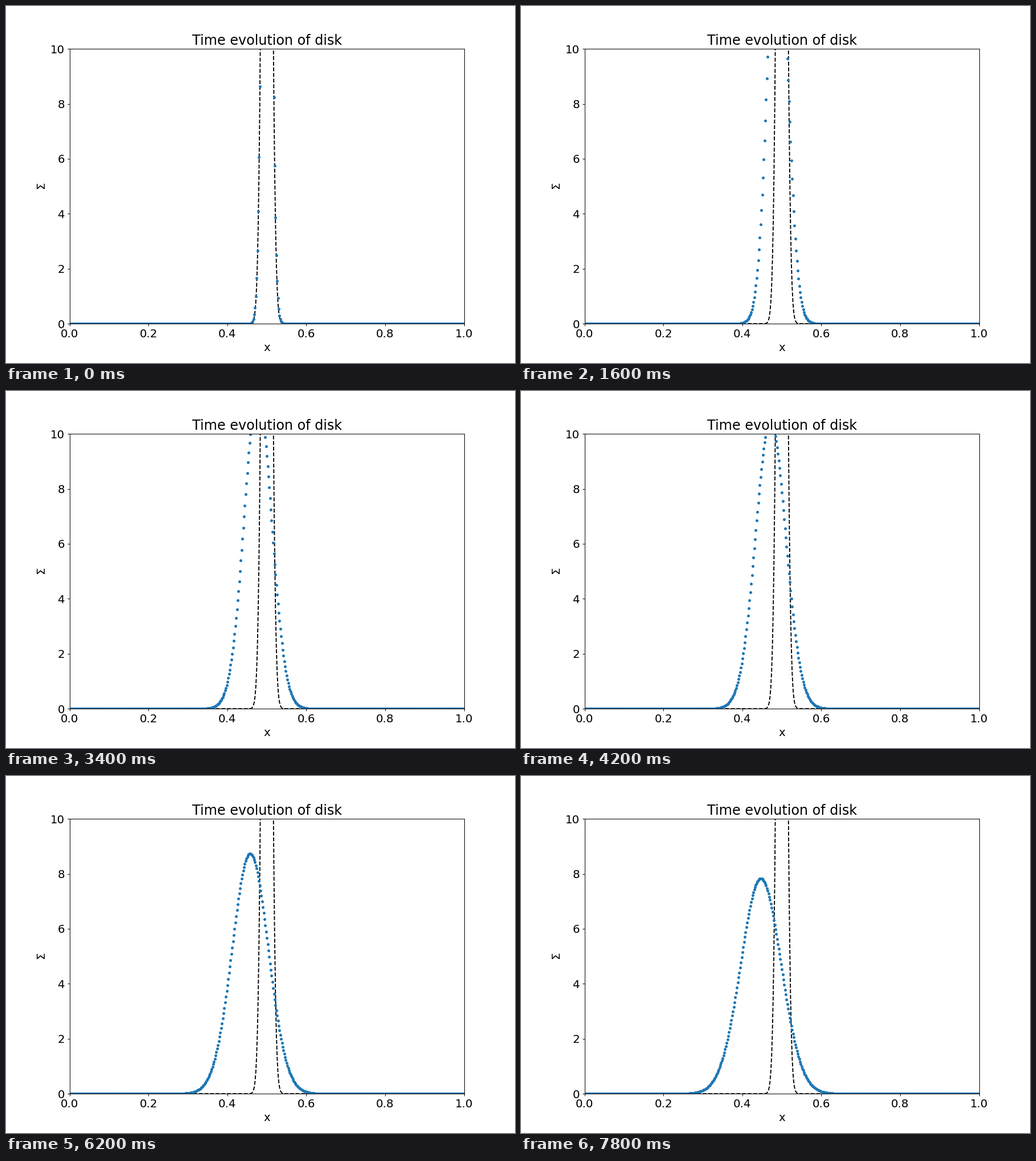
A matplotlib script for the animation above (8000 ms loop, 894 px wide and 626 px high).

```python
import numpy as np
import matplotlib.pyplot as plt
from matplotlib.animation import FuncAnimation

plt.rcParams["font.family"] = "DejaVu Sans"
plt.rcParams["font.size"] = 16

DPI = 89.4
FRAMES, INTERVAL = 40, 200
STEPS = 10             # time steps between two frames
CENTRE, VAR = 0.5, 1e-4
DRIFT = 1.366e-4       # inward shift per step
SPREAD = 6.38e-6       # variance gained per step

x = np.linspace(0, 1, 501)


def density(step):
    """Unit-mass ring that drifts inward and spreads."""
    centre = CENTRE - DRIFT * step
    var = VAR + SPREAD * step
    return np.exp(-(x - centre) ** 2 / (2 * var)) / np.sqrt(2 * np.pi * var)


fig, ax = plt.subplots(figsize=(10, 7.00225), dpi=DPI)
ax.plot(x, density(0), "k--")
dots, = ax.plot(x, density(1), ".", color="tab:blue")

ax.set_xlim(0, 1)
ax.set_ylim(0, 10)
ax.set_title("Time evolution of disk")
ax.set_xlabel("x")
ax.set_ylabel(r"$\Sigma$")


def update(i):
    dots.set_ydata(density(STEPS * i + 1))
    return dots,


anim = FuncAnimation(fig, update, frames=FRAMES, interval=INTERVAL,
                     repeat=True, repeat_delay=0)
plt.show()
```
